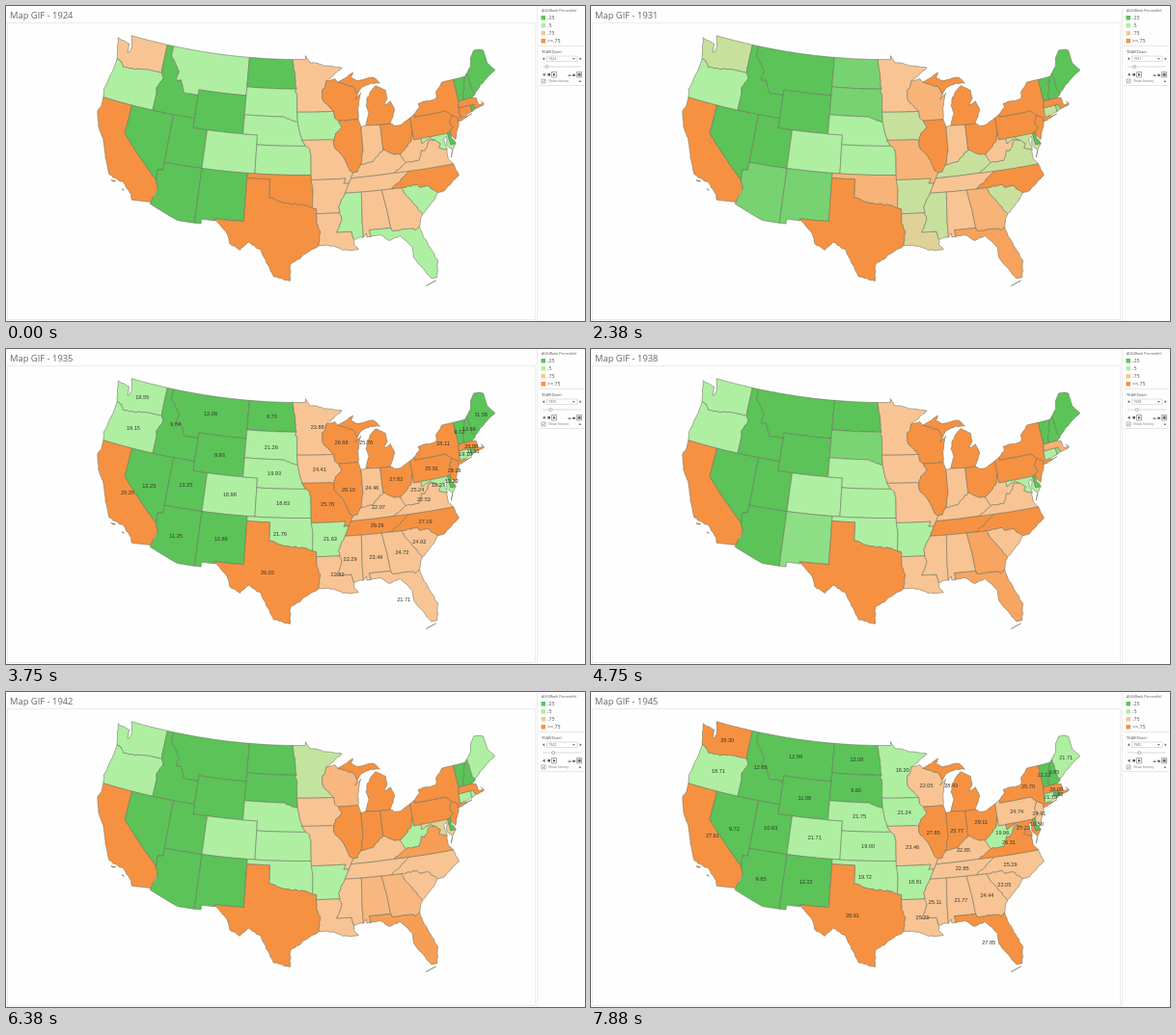
An HTML page that plays this animation: 600 px wide and 327 px high, repeating every 8 s.

```html
<!DOCTYPE html>
<html lang="en">
<head>
<meta charset="utf-8">
<title>Map by year</title>
<style>
html, body { margin: 0; height: 100%; overflow: hidden; background: #fefefe; }
svg { display: block; width: 100%; height: 100%; font-family: "Open Sans", "Noto Sans", sans-serif; }
.states path { stroke: #6d705c; stroke-width: .55; stroke-linejoin: round; }
.labels { font: 5.6px "Liberation Sans", Arial, sans-serif; text-anchor: middle; fill: #33362c; }
</style>
</head>
<body>
<svg viewBox="0 0 600 327"></svg>
<script>
const svg = document.querySelector('svg');

function el(tag, attrs, text, parent = svg) {
  const node = document.createElementNS('http://www.w3.org/2000/svg', tag);
  for (const key in attrs) node.setAttribute(key, attrs[key]);
  if (text) node.textContent = text;
  return parent.appendChild(node);
}
const line = (d, stroke = '#dedede', width = .7) => el('path', { d, stroke, 'stroke-width': width, fill: 'none' });
const shape = (d, fill) => el('path', { d, fill });
const text = (x, y, size, str, fill = '#666') => el('text', { x, y, 'font-size': size, fill }, str);
const mix = (a, b, f) => a.map((v, i) => v + (b[i] - v) * f);

let seed = 7;
const random = () => (seed = seed * 16807 % 2147483647) / 2147483647;

// Albers equal-area conic; input is degrees west and north
function project([lon, lat]) {
  const rad = Math.PI / 180, n = .60285;
  const rho = 571 * Math.sqrt(1.3512 - 2 * n * Math.sin(lat * rad)) / n;
  const a = n * (96 - lon) * rad;
  return [305.2 + rho * Math.sin(a), rho * Math.cos(a) - 573.6];
}

// Adds an edge in short steps, so that parallels bend; rough edges wander like rivers and coasts
function addEdge(pts, end, rough) {
  const start = pts[pts.length - 1];
  if (start) {
    const steps = Math.ceil(Math.hypot(end[0] - start[0], end[1] - start[1]) / (rough ? .35 : 1));
    for (let s = 1; s < steps; s++) {
      pts.push(mix(start, end, s / steps).map(v => rough ? v + (random() - .5) * .14 : v));
    }
  }
  pts.push(end);
}

// Points are "lon,lat"; "~" makes the edge rough; names are shared borders, reversed by "-"
const borders = {};
function parse(str, rough = false) {
  const pts = [];
  for (const token of str.trim().split(/\s+/)) {
    const [, mark, name] = token.match(/^([~-]?)(.+)/);
    const known = borders[name];
    if (known) {
      const part = mark ? [...known].reverse() : known;
      addEdge(pts, part[0]);
      pts.push(...part);
    } else addEdge(pts, name.split(',').map(Number), rough || mark);
  }
  return pts;
}
const border = (name, str) => { borders[name] = parse(str, true); };

border('WAOR', '123.9,46.2 123.2,46.1 122.7,45.6 121.2,45.7 119,46');
border('IDOR', '116.9,46 116.5,45.5 117.2,44.4 117,43.8');
border('IDMT', '116,48 114.4,46.6 114.6,45.6 113.9,45.7 113,44.4 111,44.5');
border('NDMN', '97.2,49 96.8,47 96.6,45.9');
border('SDMN', '96.6,45.9 96.8,45.6 96.5,45.3');
border('NESD', '98.5,43 97.9,42.8 96.4,42.5');
border('NEIA', '96.4,42.5 95.8,40.6');
border('KSMO', '95.3,40 94.9,39.8 94.6,39.1');
border('TXOK', '100,34.6 98.1,34.1 95.5,33.9 94.5,33.6');
border('TXLA', '94,32 93.6,31.2 93.8,29.7');
border('MNWI', '92.1,46.7 92.3,46.1 92.8,45.6 92.7,44.7 91.2,43.5');
border('IAWI', '91.2,43.5 91.1,42.8 90.6,42.5');
border('IAIL', '90.6,42.5 90.2,41.8 91.1,41.2 91.4,40.4');
border('MOIL', '91.4,40.4 91.4,39.9 90.2,38.7 89.5,37.3 89.1,37');
border('ARMS', '90.3,35 91.2,33.6 91.1,33');
border('LAMS', '91.1,33 90.9,32.3 91.6,31');
border('TNNC', '81.7,36.6 82.9,35.9 84.3,35');
border('KYIL', '89.1,37 88.5,37.1 88,37.8');
border('KYIN', '88,37.8 86.3,38 85.4,38.7 84.8,39.1');
border('KYOH', '84.8,39.1 83.7,38.6 82.6,38.4');
border('KYWV', '82.6,38.4 82,37.5');
border('KYVA', '82,37.5 83.7,36.6');
border('ILIN', '87.5,39.3 88,37.8');
border('OHWV', '80.5,40.6 80.8,39.7 81.7,39 82.6,38.4');
border('WIMI', '90.4,46.5 88.1,45.9 87.6,45.1');
border('PANJ', '74.7,41.4 75.2,40.7 74.8,40.2 75.4,39.8');
border('MDVA', '76.3,38.1 77.3,38.4 77,38.8 77.7,39.3');
border('MDWV', '77.7,39.3 78.2,39.6 79.5,39.2');
border('WVVA', '77.7,39.3 78.3,39.4 79.3,38.4 79.7,38.5 80.3,37.5 82,37.5');
border('SCNC', '78.6,33.9 79.7,34.8 80.8,34.8 81,35.1 83.1,35');
border('SCGA', '83.1,35 81.9,33.3 80.9,32');
border('GAFL', '81.5,30.7 82.1,30.4 82.2,30.6 84.9,30.7 85,31');
border('VTNH', '71.5,45 72.4,43.4 72.5,42.7');
border('NHME', '71.1,45.3 71,43.4 70.7,43.1');

const palette = [[91, 195, 88], [174, 239, 162], [248, 196, 148], [246, 145, 65]];
const typical = [11.5, 20, 23.5, 27.5];
const states = [];
const mapLayer = el('g', { class: 'states' });
const labelLayer = el('g', { class: 'labels' });
const middle = list => (Math.min(...list) + Math.max(...list)) / 2;

// history: first quartile, then "year>quartile" for each change
function state(history, path) {
  const rings = path.split('/').map(part => parse(part).map(project));
  const all = rings.flat();
  const d = rings.map(ring => 'M' + ring.map(p => p.map(v => v.toFixed(1))).join('L') + 'Z').join('');
  const [first, ...changes] = history.split(' ');
  states.push({
    first, changes: changes.map(c => c.split('>')),
    node: el('path', { d }, '', mapLayer),
    label: el('text', { x: middle(all.map(p => p[0])), y: middle(all.map(p => p[1])) + 2 }, '', labelLayer)
  });
}

// West
state('2 31>1 43>3', '122.8,49 117,49 117,46.4 116.9,46 -WAOR ~124.1,46.7 ~124.7,48.4 ~122.8,48.1 ~122.7,47.2 ~122.4,47.3 ~122.3,48');
state('1', 'WAOR IDOR 117,42 124.2,42 ~124.5,42.8 ~124,45');
state('3', '124.2,42 120,42 120,39 114.6,35 ~114.2,34.2 ~114.7,32.7 117.1,32.5 ~117.3,33 ~118.5,34 ~120.6,34.5 ~121.9,36.6 ~122.5,37.7 ~123.7,39 ~124.4,40.4 ~124.1,41.1 / 120.2,34 119.6,34 119.9,33.9 / 118.6,33.4 118.3,33.3 118.5,33.3');
state('0', '117,49 116,49 IDMT 111,42 117,42 -IDOR 117,46.4');
state('0', '120,42 114,42 114,36.2 114.7,36.1 114.6,35 120,39');
state('1 26>0', '116,49 104,49 104,45 111,45 -IDMT');
state('0', '111,45 104,45 104,41 111,41');
state('0', '114,42 111,42 111,41 109,41 109,37 114,37');
state('1', '109,41 102,41 102,37 109,37');
state('0 26>1 31>0', '114,37 109,37 109,31.3 111.1,31.3 114.8,32.5 114.7,32.7 ~114.2,34.2 ~114.6,35 114.7,36.1 114,36.2');
state('0 26>1 31>0 38>1 41>0', '109,37 103,37 103,32 106.6,32 106.5,31.8 108.2,31.8 108.2,31.3 109,31.3');

// Plains
state('0 30>1 31>0', '104,49 NDMN 104,45.9');
state('1 27>0 30>1 31>0 34>1 38>0', '104,45.9 SDMN 96.5,43.5 -NESD 104,43');
state('1', '104,43 NESD NEIA 95.3,40 102,40 102,41 104,41');
state('1', '102,40 KSMO 94.6,37 102,37');
state('3 31>2 33>1', '103,37 94.6,37 94.4,35.4 -TXOK 100,36.5 103,36.5');
state('3', '103,36.5 100,36.5 TXOK 94,33.5 TXLA ~95.3,28.9 ~97.2,27.7 ~97.2,26 ~99.1,26.4 ~100.7,29.1 ~102.3,29.9 ~103.2,29 ~104.5,29.6 ~104.9,30.6 ~106.6,32 103,32');
state('2 42>1', '97.2,49 95.2,49 95.2,49.4 ~94.6,48.7 ~92,48.3 ~89.6,48 ~91,47.2 MNWI 96.5,43.5 -SDMN -NDMN');
state('1 30>2 31>1 33>2 44>1', '96.5,43.5 IAWI IAIL 91.7,40.6 -NEIA');
state('2 27>1 30>3 31>2 34>3 37>2', '95.8,40.6 91.7,40.6 MOIL 89.4,36.5 89.7,36 90.4,36 90.1,36.5 94.6,36.5 94.6,37 -KSMO');
state('2 31>1', '94.6,36.5 90.1,36.5 90.4,36 89.7,36 ARMS 94,33 94,33.5 94.5,33.6 94.4,35.4');
state('2 30>1 31>2', '94,33 LAMS 89.8,31 89.6,30.2 ~89.6,29.6 ~89.1,29.1 ~90.9,29.1 ~92,29.6 ~93.8,29.7 -TXLA');

// Great Lakes and South
state('3 31>2 33>3 42>2', '92.1,46.7 ~90.8,46.9 WIMI ~88,44.6 ~87.1,45.2 ~87.7,43.7 ~87.8,42.5 -IAWI -MNWI');
state('3', '90.6,42.5 87.8,42.5 87.5,41.7 ILIN -KYIL -MOIL -IAIL');
state('3', 'WIMI ~87,45.7 ~85.5,46.1 ~84.1,46 ~84.5,46.4 ~85,46.7 ~87.4,46.5 ~88.4,46.9 ~88,47.4 ~88.9,47 / 86.8,41.8 ~86.2,43 ~86.5,43.8 ~86.2,44.7 ~84.8,45.8 ~83.4,45.2 ~83.3,44.4 ~83.9,43.7 ~82.9,44 ~82.5,43 ~83.4,41.7 84.8,41.7');
state('2 41>3', '87.5,41.7 86.8,41.8 84.8,41.7 -KYIN -ILIN');
state('3', '84.8,41.7 83.4,41.7 ~82.5,41.4 ~81.7,41.5 ~80.5,42 OHWV -KYOH');
state('2 27>1 30>2 31>1 33>2', 'KYIL KYIN KYOH KYWV KYVA 89.4,36.5');
state('2 34>3 41>2', '89.4,36.5 83.7,36.6 TNNC 90.3,35 89.7,36');
state('1 30>2 31>1 33>2', '90.3,35 88.2,35 88.4,31.9 88.4,30.3 ~89.6,30.2 89.8,31 -LAMS -ARMS');
state('2 41>3 42>2', '88.2,35 85.6,35 85.2,32.9 85,31 87.6,31 87.5,30.3 ~88,30.3 88,30.7 88.4,30.3 88.4,31.9');
state('2 30>3 31>2 38>3 42>2', '85.6,35 84.3,35 SCGA ~81.2,31.6 GAFL 85.2,32.9');
state('1 27>3 30>2 31>3 33>2 38>3 41>2 42>3', '87.6,31 -GAFL ~81.3,29.9 ~80.6,28.3 ~80,26.9 ~80.4,25.2 ~81.1,25.2 ~82.7,27.6 ~82.7,28.7 ~84,30.1 ~85.3,29.7 ~86.4,30.4 ~87.5,30.3 / 80.6,24.9 81.2,24.7 81.8,24.5');
state('1 30>2 31>1 33>2', 'SCNC SCGA ~79.3,33.1');
state('3 41>2', '81.7,36.6 75.9,36.5 ~75.5,35.2 ~76.5,34.7 ~77.9,33.9 SCNC -TNNC');
state('2 31>1 33>2 42>3', '-MDVA ~76.4,37.1 ~75.9,36.5 83.7,36.6 -KYVA -WVVA / 75.6,37.9 76,37.2');
state('2 41>1', '80.5,40.6 80.5,39.7 79.5,39.7 -MDWV WVVA -KYWV -OHWV');

// Northeast
state('3 44>2', '80.5,42 79.8,42.3 79.8,42 75.4,42 PANJ 75.8,39.7 80.5,39.7');
state('3', '79.8,42.3 ~78.9,42.9 ~79,43.3 ~76.3,43.5 ~76.2,44.1 ~75,45 73.3,45 73.3,42.7 73.5,42 73.6,41 ~72.4,41 71.9,41.1 ~74,40.6 73.9,41 74.7,41.4 75.4,42 79.8,42');
state('3 44>2', '73.9,41 ~74,40.4 ~74.9,38.9 ~75.5,39.5 -PANJ');
state('1 27>2 31>1 42>2 44>3', '79.5,39.7 75.8,39.7 75.7,38.5 75,38.5 75.6,37.9 ~76.2,38.5 ~76,39.4 ~76.5,39.2 ~76.3,38.1 MDVA MDWV');
state('0', '75.8,39.7 75.4,39.8 ~75.4,39.1 ~75,38.5 75.7,38.5');
state('3 27>2 31>1', '73.5,42 71.8,42 71.8,41.3 ~73.6,41');
state('0 31>1 34>0 38>1 44>0', '71.8,42 71.4,42 71.2,41.5 71.8,41.3');
state('3 38>2 41>3', '73.5,42 73.3,42.7 71.3,42.7 ~70.8,42.6 ~70.6,41.8 70,41.8 70.2,42.1 69.9,41.7 ~71.2,41.5 71.4,42');
state('0', '73.3,45 VTNH 73.3,42.7');
state('0', '71.5,45 NHME 70.8,42.9 71.3,42.7 -VTNH');
state('0 41>1', '-NHME ~70.3,45.9 70,46.7 69.2,47.4 68.3,47.3 67.8,47.1 67.8,45.7 ~67,44.8 ~69,44 ~70.7,43.1');

// Sheet frame and side panel
line('M1 17.5H548.5V325.5H1.5V17.5M550.5 0V327', '#e4e4e4');
line('M552 41.5H599M552 82.5H599');
const title = text(4, 13, 9.4, '');
text(555, 5.5, 3.7, 'AGG(Rank Percentile)', '#555');
['.25', '.5', '.75', '>=.75'].forEach((name, i) => {
  const y = 10 + i * 8;
  shape(`M554.5 ${y}h4.5v4.5h-4.5z`, `rgb(${palette[i]})`);
  text(561, y + 4.2, 5.3, name, '#555');
});
text(555, 48.5, 4, 'YEAR(Date)', '#555');
line('M560.5 52H592V57.5H560.5Z', '#ccc', .6);
const picker = text(562, 56.2, 3.6, '');
shape('M558 53.2v3l-2-1.5zM594.5 53.2v3l2-1.5zM587 54h2.6l-1.3 1.8z', '#666');
line('M556 63H596', '#d0d0d0', .8);
const knob = el('circle', { cy: 63, r: 1.5, fill: '#fff', stroke: '#888', 'stroke-width': .6 });
line('M565.5 68.5h5v5.5h-5zM591.5 68.5h5v5.5h-5z', '#888');
shape('M558.5 69.5v3.4l-2.4-1.7zM561.4 70h2.6v2.6h-2.6zM567 69.4v3.6l2.6-1.8z', '#555');
shape('M582.5 71.6h3v1.2h-3zM587 70.8h3v2h-3zM592.6 69.8h3v3h-3z', '#667');
line('M555 76h4v4h-4zM555.9 78l.9 1 1.4-2', '#888', .6);
text(562, 79.3, 3.5, 'Show history', '#777');
shape('M593.5 78.8h2.6l-1.3-1.8z', '#555');

// Playback pace: [step, year]; it runs a little faster in the second stretch
const pace = [[0, 1924.58], [19, 1931.2], [30, 1935.7], [63, 1945.95]];

function yearAt(step) {
  const i = Math.max(1, pace.findIndex(p => p[0] >= step));
  const [from, to] = [pace[i - 1], pace[i]];
  return mix(from, to, (step - from[0]) / (to[0] - from[0]))[1];
}

const rankAt = ({ first, changes }, year) =>
  changes.reduce((rank, [from, next]) => year - 1900 >= from ? next : rank, first);

// Each year fades in, rests, then shows its values
function draw(now) {
  const time = yearAt(Math.floor(now % 8000 / 125));
  const year = Math.floor(time), phase = time - year;
  const fade = Math.min(1, phase / .3);
  title.textContent = 'Map GIF - ' + year;
  picker.textContent = year;
  knob.setAttribute('cx', 560.5 + (year - 1924) * .37);
  labelLayer.setAttribute('visibility', phase > .69 ? 'visible' : 'hidden');
  states.forEach((s, i) => {
    const rank = rankAt(s, year);
    const rgb = mix(palette[rankAt(s, year - 1)], palette[rank], fade);
    s.node.setAttribute('fill', `rgb(${rgb.map(Math.round)})`);
    s.label.textContent = (typical[rank] + 1.8 * Math.sin(year * 1.7 + i * 2.4)).toFixed(2);
  });
  requestAnimationFrame(draw);
}
requestAnimationFrame(draw);
</script>
</body>
</html>
```
